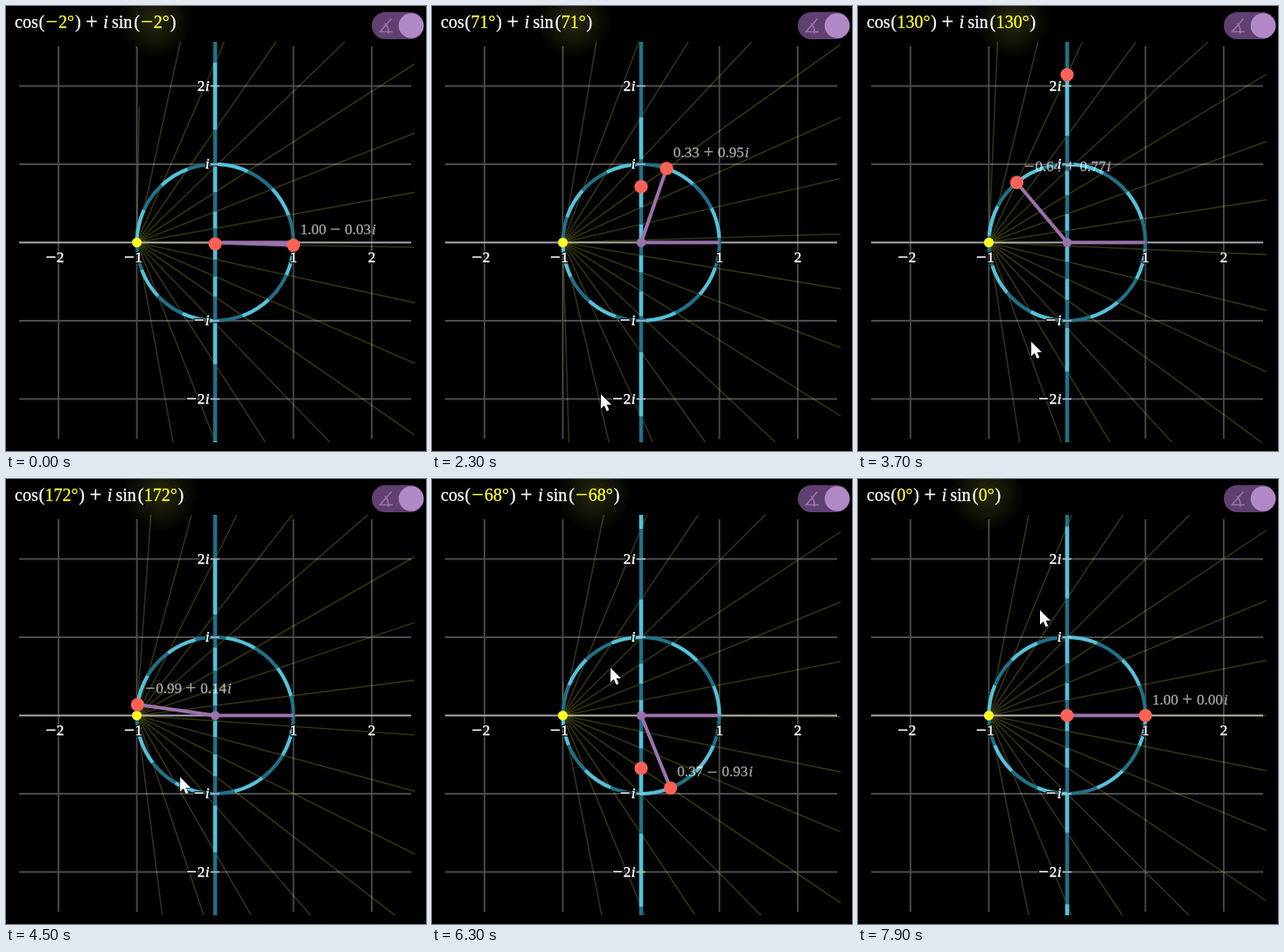
An HTML page that plays this animation: 480 by 509 pixels, repeating every 8 s.

```html
<!DOCTYPE html>
<html lang="en">
<head>
<meta charset="utf-8">
<title>Unit circle and its projection</title>
<style>
  html, body { margin: 0; width: 100%; height: 100%; overflow: hidden; background: #000; }
  svg { display: block; width: 480px; height: 509px; }
  text { font-family: "Liberation Serif", "Times New Roman", serif; fill: #fff; stroke: #fff; stroke-width: .3px; }
  .it { font-style: italic; }
  .hot { fill: #ffff2e; stroke: #ffff2e; }
  .op { font-size: 1.22em; }
  #label { opacity: .66; }
  .halo { stroke: #000; stroke-width: 3px; stroke-linejoin: round; }
  .ink { stroke-width: .5px; }
  .line { fill: none; }
</style>
</head>
<body>
<svg viewBox="0 0 480 509">
  <defs>
    <clipPath id="plot"><rect x="15" y="41" width="452" height="458"/></clipPath>
    <radialGradient id="haze">
      <stop offset="0" stop-color="#ffff60" stop-opacity=".16"/>
      <stop offset="1" stop-color="#ffff60" stop-opacity="0"/>
    </radialGradient>
  </defs>
  <rect width="480" height="509"/>
  <path id="grid" class="line" stroke="#4c4c4c" stroke-width="1.8"/>
  <path class="line" d="M15 270.5H463" stroke="#aca8ac" stroke-width="2.2"/>
  <g clip-path="url(#plot)">
    <path id="rays" class="line" stroke="#ffff50" stroke-opacity=".2" stroke-width="1.6"/>
    <g class="line" stroke="#1f7187" stroke-width="4">
      <circle cx="239" cy="270.5" r="89.5"/>
      <path d="M239 41V499" stroke-width="4.5"/>
    </g>
    <g class="line" stroke="#56c0d8">
      <path id="arcs" stroke-width="4"/>
      <path id="dashes" stroke-width="4.5"/>
    </g>
  </g>
  <text id="label" font-size="17"></text>
  <path id="marks" class="line" stroke="#c0c0c0" stroke-width="1.5"/>
  <g id="ticks"></g>
  <path id="wedge" stroke="#9a72ac" stroke-width="4" stroke-linejoin="round" fill="none"/>
  <circle cx="239" cy="270.5" r="5.2" fill="#9a72ac"/>
  <circle cx="149.5" cy="270.5" r="5.5" fill="#ffff24"/>
  <g fill="#fc6255" clip-path="url(#plot)">
    <circle id="shadow" cx="239" r="7.6"/>
    <circle id="point" r="7.6"/>
  </g>
  <circle id="glow" cy="17" r="44" fill="url(#haze)"/>
  <text id="title" font-size="20"></text>
  <rect x="418" y="7" width="59.5" height="31" rx="15.5" fill="#5f4070"/>
  <circle cx="463" cy="22.5" r="14.3" fill="#b189c6"/>
  <path class="line" d="M442 29.5H427.5L440.5 14.5M433 19.5Q437.5 24 437 31.5" stroke="#9a72ac" stroke-width="1.6"/>
  <path id="cursor" d="M0 0V16.5L3.8 13L6.6 19.3L9.4 18L6.7 11.9H12Z" fill="#fff" stroke="#000" stroke-width="1" paint-order="stroke"/>
</svg>
<script>
const $ = id => document.getElementById(id);
const OX = 239, OY = 270.5, R = 89.5, PX = OX - R;
const STEP = 11.25, COUNT = 16, FAR = 1000, LOOP = 8000;
const rad = deg => deg * Math.PI / 180;
const onCircle = deg => [OX + R * Math.cos(rad(deg)), OY - R * Math.sin(rad(deg))];
const onAxis = deg => Math.max(-FAR, Math.min(FAR, OY - R * Math.tan(rad(deg))));
const pair = p => p.map(v => v.toFixed(2)).join(" ");

// Drag path: time, turned angle, pointer position
const times = [0, 1200, 2300, 3700, 4500, 6300, 7900];
const turns = [-2, 29, 71, 130, 172, 292, 360];
const ptrX = [186, 189, 193, 198, 199, 204, 208];
const ptrY = [515, 485, 444, 384, 341, 216, 150];

// Smooth curve through the knots
function curve(v, t) {
  const n = times.length;
  const slope = i => (v[i + 1] - v[i]) / (times[i + 1] - times[i]);
  const tangent = i => i === 0 ? slope(0) * .7 : i === n - 1 ? slope(n - 2) * .6 : (slope(i - 1) + slope(i)) / 2;
  let i = 0;
  while (i < n - 2 && t > times[i + 1]) i++;
  const h = times[i + 1] - times[i], u = Math.min(1, (t - times[i]) / h);
  const a = u * u * (3 - 2 * u);
  return v[i] * (1 - a) + v[i + 1] * a
    + h * u * (1 - u) * ((1 - u) * tangent(i) - u * tangent(i + 1));
}

// Math text: tokens are [text, advance in em, class, offset in em]
const I = ["i", .345, "it", .03];
const neg = (cls = "") => ["−", .778, cls + " op", .05];
const op = v => [v < 0 ? "−" : "+", 1.222, "op", .24];
const num = (s, cls) => [s, s.length * .5 + (s.includes(".") ? -.222 : 0), cls];
const width = tokens => tokens.reduce((w, t) => w + t[1], 0);

function setText(el, tokens, x, y, size) {
  let at = x;
  el.innerHTML = tokens.map(([s, w, cls = "", off = 0]) => {
    const drop = cls.includes("op") ? .06 * size : 0;
    const span = `<tspan x="${(at + off * size).toFixed(2)}" y="${y + drop}" class="${cls}">${s}</tspan>`;
    at += w * size;
    return span;
  }).join("");
}

function addTick(tokens, x, y, align) {
  for (const layer of ["halo", "ink"]) {
    const el = document.createElementNS("http://www.w3.org/2000/svg", "text");
    el.setAttribute("font-size", 17);
    el.setAttribute("class", layer);
    $("ticks").append(el);
    setText(el, tokens, x - width(tokens) * 17 * align, y, 17);
  }
}

function buildGrid() {
  let grid = "", marks = "";
  for (const k of [-2, -1, 1, 2]) {
    const x = OX + k * R, y = OY - k * R;
    grid += `M${x} 46V495M15 ${y}H463`;
    marks += `M234 ${y}H244`;
    const sign = k < 0 ? [neg()] : [], digit = num(String(Math.abs(k)));
    addTick([...sign, digit], x - (k < 0 ? 4.5 : 0), 292.5, .5);
    addTick([...sign, ...(Math.abs(k) > 1 ? [digit] : []), I], 233, y + 5, 1);
  }
  $("grid").setAttribute("d", grid);
  $("marks").setAttribute("d", marks);
}

function drawFan(theta) {
  let rays = "", arcs = "", dashes = "";
  for (let k = 0; k < COUNT; k++) {
    const a = ((theta / 2 + k * STEP + 90) % 180 + 180) % 180 - 90;
    const len = Math.min(600, 155 * (90 - Math.abs(a)));
    rays += `M${PX} ${OY}L${pair([PX + len * Math.cos(rad(a)), OY - len * Math.sin(rad(a))])}`;
    if (k % 2) {
      const b = a + STEP;
      arcs += `M${pair(onCircle(2 * a))}A${R} ${R} 0 0 0 ${pair(onCircle(2 * b))}`;
      dashes += `M${OX} ${onAxis(a)}V${b >= 90 ? -FAR : onAxis(b)}`;
      if (b > 90) dashes += `M${OX} ${FAR}V${onAxis(b)}`;
    }
  }
  $("rays").setAttribute("d", rays);
  $("arcs").setAttribute("d", arcs);
  $("dashes").setAttribute("d", dashes);
}

function drawTitle(deg) {
  const angle = [...(deg < 0 ? [neg("hot")] : []), num(String(Math.abs(deg)), "hot"), ["°", .42, "hot"]];
  const open = ["(", .389, "", .04], close = [")", .389, "", .02];
  const head = [["cos", 1.338], open, ...angle, close, op(1), I, ["", .167], ["sin", 1.228], open];
  setText($("title"), [...head, ...angle, close], 10, 25, 20);
  $("glow").setAttribute("cx", 10 + 20 * (width(head) + width(angle) / 2));
}

function drawPoint(deg) {
  const [x, y] = onCircle(deg), c = Math.cos(rad(deg)), s = Math.sin(rad(deg));
  $("point").setAttribute("cx", x);
  $("point").setAttribute("cy", y);
  $("shadow").setAttribute("cy", onAxis(deg / 2));
  const wedge = $("wedge");
  wedge.setAttribute("d", `M${OX + R} ${OY}L${OX} ${OY}L${pair([x, y])}`);
  wedge.setAttribute("fill", Math.abs(deg) < 4 ? "#9a72ac" : "none");
  const fixed = v => num(Math.abs(v).toFixed(2));
  setText($("label"), [...(c < 0 ? [neg()] : []), fixed(c), op(s), fixed(s), I], x + 7.7, y - 13, 17);
}

function draw(ms) {
  const t = Math.floor(ms % LOOP / 100) * 100;
  const turn = Math.round(curve(turns, t));
  const deg = turn > 180 ? turn - 360 : turn;
  drawFan(deg);
  drawTitle(deg);
  drawPoint(deg);
  $("cursor").setAttribute("transform",
    `translate(${Math.round(curve(ptrX, t))} ${Math.round(curve(ptrY, t))})`);
}

buildGrid();
const start = performance.now();
function loop() {
  draw(performance.now() - start);
  requestAnimationFrame(loop);
}
loop();
</script>
</body>
</html>
```
